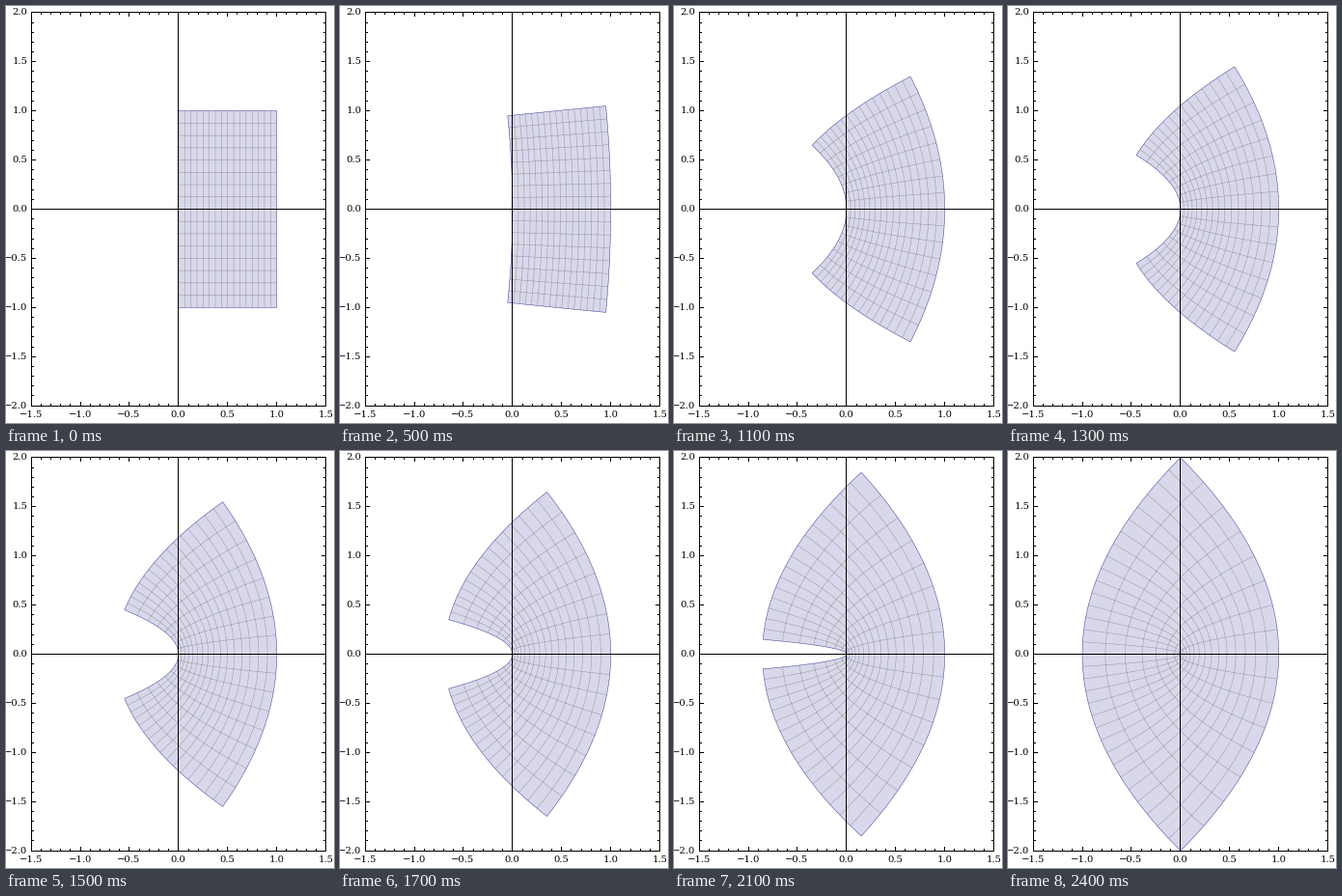
A matplotlib script for the animation above (2900 ms loop, 340 by 432 pixels).

```python
import matplotlib.pyplot as plt
import numpy as np
from matplotlib.animation import FuncAnimation
from matplotlib.collections import LineCollection
from matplotlib.patches import Polygon

W, H, DPI = 340, 432, 100
PX = 72 / DPI                        # one pixel in points
CX, CY, UNIT = 178.85, 210.5, 101.8  # plot origin and scale in pixels
CELLS = 16
STEP_MS, FRAMES = 100, 29
HOLD, STEPS = 4, 20
BLUE = (0.24, 0.24, 0.6)

fig = plt.figure(figsize=(W / DPI, H / DPI), dpi=DPI, facecolor="white")
ax = fig.add_axes([0, 0, 1, 1])
ax.set_xlim(0, W)
ax.set_ylim(H, 0)
ax.axis("off")


def col(x):
    return np.floor(CX + x * UNIT) + 0.5


def row(y):
    return np.floor(CY - y * UNIT) + 0.5


def rule(x0, y0, x1, y1):
    # Ends sit on pixel centres, so automatic snapping would shift the line.
    ax.plot([x0, x1], [y0, y1], color="black", lw=PX, zorder=4,
            solid_capstyle="projecting", snap=False)


def label(x, y, value, ha):
    text = f"{value:.1f}".replace("-", "\u2212")
    ax.text(x, y, text, ha=ha, va="baseline", family="DejaVu Serif",
            fontsize=10 * PX, zorder=5)


def draw_frame():
    left, right, top, bottom = col(-1.5), col(1.5), row(2), row(-2)
    for y in (top, row(0), bottom):
        rule(left, y, right, y)
    for x in (left, col(0), right):
        rule(x, top, x, bottom)
    for i in range(-15, 16):
        x, size = col(i / 10), 4 if i % 5 == 0 else 2
        rule(x, top, x, top + size)
        rule(x, bottom, x, bottom - size)
        if i % 5 == 0:
            label(x, 426, i / 10, "center")
    for i in range(-20, 21):
        y, size = row(i / 10), 4 if i % 5 == 0 else 2
        rule(left, y, left + size, y)
        rule(right, y, right - size, y)
        if i % 5 == 0:
            label(22.5, np.floor(y) + 3, i / 10, "right")


def warp(z, t):
    """Blend z into z squared, in pixel coordinates."""
    w = (1 - t) * z + t * z * z
    return np.column_stack([CX + w.real * UNIT, CY - w.imag * UNIT])


u = np.linspace(0, 1, 61)
v = np.linspace(-1, 1, 121)
outline = np.concatenate([u - 1j, 1 + 1j * v, u[::-1] + 1j, 1j * v[::-1]])
inner = np.arange(1, CELLS) / CELLS
mesh = [a + 1j * v for a in inner] + [u + 1j * (2 * a - 1) for a in inner]

draw_frame()
start = warp(outline, 0)
fill = ax.add_patch(Polygon(start, fc=BLUE, ec="none", alpha=0.2, zorder=1))
grid = ax.add_collection(LineCollection(
    [], colors=[(0, 0, 0, 0.3)], linewidths=0.5 * PX, zorder=2))
edge = ax.add_patch(Polygon(start, fc="none", ec=BLUE, lw=0.5 * PX,
                            joinstyle="bevel", zorder=3))
for part in (fill, grid, edge):
    part.set_snap(False)


def update(k):
    t = min(max(k - HOLD, 0) / STEPS, 1)
    shape = warp(outline, t)
    fill.set_xy(shape)
    edge.set_xy(shape)
    grid.set_segments([warp(line, t) for line in mesh])
    return fill, grid, edge


anim = FuncAnimation(fig, update, frames=FRAMES, interval=STEP_MS,
                     repeat=True, repeat_delay=0, blit=False)
plt.show()
```
